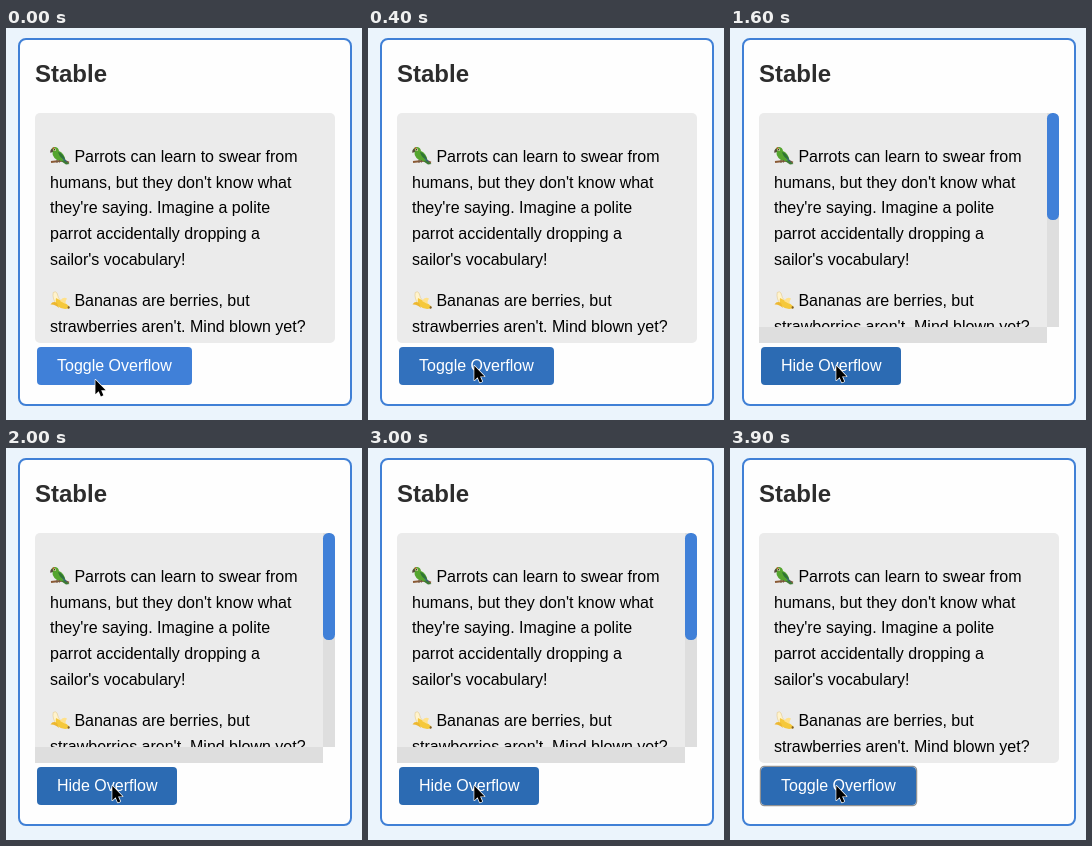
Animation, 356 px wide and 392 px high, one loop 4000 ms. Source, as an HTML page:

```html
<!DOCTYPE html>
<html lang="en">
<head>
<meta charset="utf-8">
<title>Stable overflow</title>
<style>
  html, body { margin: 0; width: 100%; height: 100%; overflow: hidden; background: #ebf4fc; }
  svg { display: block; }
  text { font: 16px "Liberation Sans", Arial, sans-serif; white-space: pre; }
  .title { font-size: 24px; font-weight: bold; fill: #2d2d2d; }
</style>
</head>
<body>
<svg width="356" height="392" viewBox="0 0 356 392">
  <defs>
    <clipPath id="panelClip"><rect id="clipBox" x="29" y="85" width="300" height="230"/></clipPath>
  </defs>
  <rect width="356" height="392" fill="#ebf4fc"/>
  <rect x="13" y="11" width="332" height="366" rx="7" fill="#fefefe" stroke="#4080d6" stroke-width="2"/>
  <text class="title" x="29" y="54">Stable</text>

  <rect x="29" y="85" width="300" height="230" rx="5" fill="#ebebeb"/>
  <g clip-path="url(#panelClip)">
    <g id="lines"></g>
    <g id="parrot">
      <path d="M45 134 L58 132.5 L63 134.5" fill="none" stroke="#8a5a35" stroke-width="1.8"/>
      <path d="M54 128 L63.5 136 L60 136.5 L52 131Z" fill="#3d7a35"/>
      <path d="M45 122 Q46 118.5 49.5 119 Q52.5 119.5 53 123 Q58 125 59.5 132 Q52 134.5 48.5 130 Q46 127 46.5 124Z" fill="#55a52f"/>
      <path d="M52 124 Q57 125 59 131.5 Q54 131 52 124Z" fill="#2f7534"/>
      <path d="M56 128.5 L62 134.5 L58 132.5Z" fill="#315a87"/>
      <path d="M46.5 120.8 Q43.5 121.5 44.5 125 L47.3 123.5Z" fill="#594b3f"/>
      <path d="M46 120.5 L48 119 L48.5 121Z" fill="#d54332"/>
      <circle cx="48.7" cy="121.7" r="1.3" fill="#f2e6b4"/>
      <circle cx="48.6" cy="121.7" r=".7" fill="#222"/>
      <path d="M51 132 v3 M53.5 132 v2.5" stroke="#6e5948"/>
    </g>
    <g id="banana">
      <path d="M47.2 264.5 Q49.5 262.8 51 265 Q51.5 270 56 274 L51 277 Q46 271 47.2 264.5Z" fill="#fff3cc" stroke="#e3c98d" stroke-width=".6"/>
      <path d="M50 270 Q54 272 57 274 Q61 276 63.5 278.5 L62.5 280.5 Q56 282 51.5 278 Q49 275 50 270Z" fill="#f5c83a"/>
      <path d="M51 275 Q47 272.5 44.5 276.5 Q49 276 53 280Z" fill="#edb72f"/>
      <path d="M54 273 Q57 268 61 270.5 Q59 273 59.5 276Z" fill="#ffe189"/>
      <path d="M62 278 L64 279 L63 281 L61.5 280Z" fill="#80602d"/>
    </g>
  </g>

  <g id="bars">
    <rect x="317" y="85" width="12" height="214" fill="#dedede"/>
    <rect x="29" y="299" width="288" height="16" fill="#dedede"/>
    <rect x="317" y="299" width="12" height="16" fill="#fefefe"/>
    <path d="M317 85 h6 a6 6 0 0 1 6 6 h0 v-6z" fill="#fefefe"/>
    <rect x="317" y="85" width="12" height="107" rx="5.5" fill="#4080d8"/>
  </g>

  <rect id="ring" x="30.4" y="318.4" width="156.2" height="39.2" rx="4" fill="none" stroke="#929292" stroke-width="1.3"/>
  <rect id="button" x="31" y="319" width="155" height="38" rx="4"/>
  <text id="label" x="51" y="343" fill="#fff"></text>
  <path id="cursor" d="M0 0 V14.6 L3.3 11.5 L5.5 16.7 L8 15.6 L5.8 10.6 H10.3Z"
        fill="#000" stroke="#fff" stroke-width="1.4" stroke-linejoin="round" paint-order="stroke"/>
</svg>
<script>
const LOOP = 4000;
const CLICKS = [1600, 2300, 2800, 3400];
const FOCUS_AT = 3700;
const BASE = [64, 128, 216];
const HOVER = [44, 107, 179];
const $ = id => document.getElementById(id);

const lines = [
  [68.4, 134, "Parrots can learn to swear from"],
  [44, 160, "humans, but they don't know what"],
  [44, 185, "they're saying. Imagine a polite"],
  [44, 211, "parrot accidentally dropping a"],
  [44, 237, "sailor's vocabulary!"],
  [68.4, 278, "Bananas are berries, but"],
  [44, 304, "strawberries aren't. Mind blown yet?"]
];
for (const [x, y, words] of lines) {
  const line = document.createElementNS("http://www.w3.org/2000/svg", "text");
  line.setAttribute("x", x);
  line.setAttribute("y", y);
  line.textContent = words;
  $("lines").append(line);
}

const progress = (t, from, to) => Math.min(1, Math.max(0, (t - from) / (to - from)));
const mix = (a, b, k) => a + (b - a) * k;
const easeOut = k => 1 - (1 - k) ** 2;
const show = (id, on) => $(id).setAttribute("visibility", on ? "visible" : "hidden");

function draw(t) {
  const open = CLICKS.filter(click => t >= click).length % 2 === 1;
  const move = easeOut(progress(t, 0, 350));
  const hover = easeOut(progress(t, 180, 650));

  show("bars", open);
  show("ring", t >= FOCUS_AT);
  $("clipBox").setAttribute("width", open ? 288 : 300);
  $("clipBox").setAttribute("height", open ? 214 : 230);
  $("button").setAttribute("width", open ? 140 : 155);
  $("button").setAttribute("fill", `rgb(${BASE.map((c, i) => Math.round(mix(c, HOVER[i], hover)))})`);
  $("label").textContent = open ? "Hide Overflow" : "Toggle Overflow";
  $("cursor").setAttribute("transform", `translate(${mix(89.3, 106.3, move)} ${mix(351.8, 337.8, move)})`);
}

const start = performance.now();
function tick() {
  draw((performance.now() - start) % LOOP);
  requestAnimationFrame(tick);
}
tick();
</script>
</body>
</html>
```
